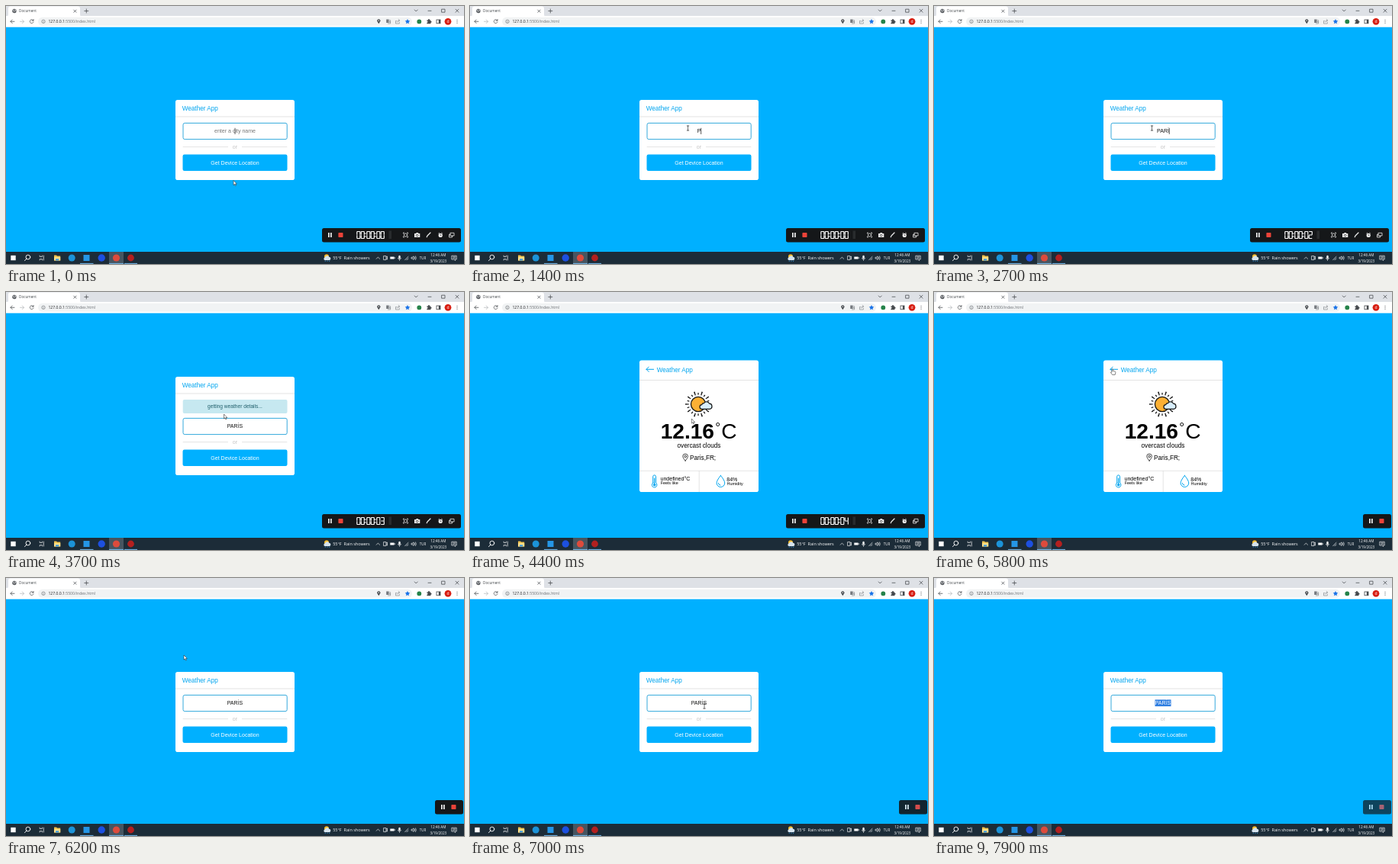
An HTML page for the animation above (8 s loop, 600 by 338 pixels).

```html
<!DOCTYPE html>
<html lang="en">
<head>
<meta charset="utf-8">
<title>Weather App</title>
<style>
  html, body { margin: 0; width: 100%; height: 100%; overflow: hidden; background: #00b0ff; }
  svg { display: block; width: 100vw; height: 100vh; }
  text { white-space: pre; font-family: "Liberation Sans", Arial, sans-serif; }
  .ui text { font-family: "Open Sans", "Noto Sans", sans-serif; }
  .line { fill: none; stroke-linecap: round; stroke-linejoin: round; }
  .mid { text-anchor: middle; }
</style>
</head>
<body>
<svg viewBox="0 0 600 338" xmlns="http://www.w3.org/2000/svg">
  <defs>
    <clipPath id="barClip"><rect id="barClipRect" y="291" height="18.5" rx="2.5"/></clipPath>
    <path id="arrow" d="M0 0V6.1L1.4 4.8L2.4 7L3.3 6.6L2.4 4.5H4.3Z" fill="#fff" stroke="#222" stroke-width=".55"/>
    <path id="beam" class="line" d="M-1.3 -3H1.3M0 -3V3M-1.3 3H1.3" stroke="#333" stroke-width=".7"/>
    <path id="hand" d="M0 0Q.8 -.6 1.4 .1V2.5L4.2 3.1Q5 3.4 4.9 4.3L4.2 7.4H.6L-1.5 4.5Q-1.4 3.6 -.5 3.9L0 4.3Z" fill="#fff" stroke="#333" stroke-width=".6"/>
  </defs>
  <rect width="600" height="338" fill="#00b0ff"/>

  <g class="ui" id="browser">
    <rect width="600" height="13.5" fill="#dee1e6"/>
    <path d="M1 13.5Q3 13.5 3 11V3Q3 .5 6 .5H94Q97 .5 97 3V11Q97 13.5 99 13.5Z" fill="#fff"/>
    <rect y="13" width="600" height="14.7" fill="#fff"/>
    <circle cx="11" cy="6.5" r="2.7" fill="#54585d"/>
    <path class="line" d="M9.2 5.2L11 6.2L10.4 7.6M12 4.6L12.9 6.8" stroke="#fff" stroke-width=".7"/>
    <text x="17" y="8.4" font-size="4.7" fill="#45494d">Document</text>
    <g class="line" stroke="#45494d" stroke-width=".75">
      <path d="M88.8 5.1L92 8.3M92 5.1L88.8 8.3M102.8 6.5H107.8M105.3 4V9"/>
      <path d="M535.2 5L537.2 7L539.2 5M553 6.3H557M571 4.2H575V8.2H571ZM589 4.2L593 8.2M593 4.2L589 8.2"/>
      <path d="M11 20.3H6M8.2 18L6 20.3L8.2 22.6"/>
      <path d="M18.5 20.3H23.5M21.3 18L23.5 20.3L21.3 22.6" stroke="#b5b8bc"/>
      <path d="M35.7 18.8A2.4 2.4 0 1 0 36 21M36.1 17.6V19.2H34.5"/>
    </g>
    <rect x="42" y="14.8" width="490" height="11" rx="5.5" fill="#f1f3f4"/>
    <circle cx="49" cy="20.3" r="2.2" fill="none" stroke="#5f6368" stroke-width=".6"/>
    <path d="M49 19V19.4M49 20.1V21.6" stroke="#5f6368" stroke-width=".6"/>
    <text x="55.4" y="22.2" font-size="5.1" fill="#202124">127.0.0.1<tspan fill="#6b6f74">:5500/index.html</tspan></text>
    <path d="M488.3 23.3Q486.2 20.5 486.2 19.3A2.1 2.1 0 0 1 490.4 19.3Q490.4 20.5 488.3 23.3Z" fill="#45494d"/>
    <circle cx="488.3" cy="19.3" r=".7" fill="#fff"/>
    <path d="M498.2 17.5H501.5V22H498.2Z" fill="#75797e"/>
    <path class="line" d="M501.8 18.7H503.6V23H500.4M502 21.5L502.8 20L503.3 21.5" stroke="#75797e" stroke-width=".6"/>
    <path class="line" d="M511.5 19.5H510.5V23H515.3V21.5M512.3 21Q512.4 18.9 515.5 18.9M514.2 17.5L515.7 18.9L514.2 20.3" stroke="#75797e" stroke-width=".6"/>
    <path d="M526 17L527 19.1L529.3 19.4L527.6 21L528 23.3L526 22.2L524 23.3L524.4 21L522.7 19.4L525 19.1Z" fill="#1a73e8"/>
    <circle cx="541.3" cy="20.4" r="2.9" fill="#25834a"/>
    <path d="M551.4 18.4H553Q553 17 554 17T555 18.4H556.4V19.8Q557.6 19.9 557.6 20.8T556.4 21.8V23.3H551.4V21.7Q552.6 21.6 552.6 20.8T551.4 19.8Z" fill="#45494d"/>
    <rect x="564" y="18" width="5" height="4.8" fill="none" stroke="#45494d" stroke-width=".8"/>
    <path d="M566.8 18H569V22.8H566.8Z" fill="#45494d"/>
    <circle cx="579" cy="20.3" r="4.4" fill="#d81f13"/>
    <text class="mid" x="579" y="22" font-size="5" fill="#fff">d</text>
    <path d="M591 18.2V22.8" class="line" stroke="#45494d" stroke-width="1.1" stroke-dasharray="0 2"/>
  </g>

  <g id="form">
    <rect id="card" x="222" width="156" rx="2.8" fill="#fff"/>
    <g id="header">
      <text x="230.7" y="136.6" font-size="8.2" fill="#00a5ef">Weather App</text>
      <path d="M222 145H378" stroke="#d2d2d2" stroke-width=".6"/>
    </g>
    <g id="pending">
      <rect x="231.7" y="141" width="136.8" height="18" rx="2" fill="#c6e8f0"/>
      <text class="mid" x="300" y="152.2" font-size="6.64" fill="#21606c">getting weather details...</text>
    </g>
    <g id="body">
      <rect x="232" y="153.4" width="136.2" height="21.2" rx="2.2" fill="#fff" stroke="#34a9dc" stroke-width="1"/>
      <rect id="selection" x="289.5" y="159.4" width="21" height="8.7" fill="#2d7de1"/>
      <text id="entry" class="mid" x="300" y="166.4" font-size="7.04"></text>
      <path id="caret" stroke="#111" stroke-width=".7"/>
      <path d="M231.7 184.6H291M309 184.6H368.3" stroke="#d0d0d0" stroke-width=".6"/>
      <text class="mid" x="300" y="186.8" font-size="7.04" fill="#c4c4c4">or</text>
      <rect x="231.5" y="194.6" width="137" height="21.4" rx="2.2" fill="#00b0ff"/>
      <text class="mid" x="300" y="207.6" font-size="7.04" fill="#fff">Get Device Location</text>
    </g>
  </g>

  <g id="result">
    <rect x="222" y="89.5" width="156" height="172.5" rx="2.8" fill="#fff"/>
    <path class="line" d="M240.6 101.3H231M234.2 98.1L231 101.3L234.2 104.5" stroke="#00a5ef" stroke-width="1"/>
    <text x="244.7" y="105" font-size="8.2" fill="#00a5ef">Weather App</text>
    <path d="M222 115.5H378M222 234.3H378M300.2 234.3V262" stroke="#d2d2d2" stroke-width=".6"/>
    <g fill="none" stroke="#161616">
      <circle cx="299" cy="147" r="14.6" stroke-width="4.8" pathLength="10" stroke-dasharray=".15 .85" stroke-dashoffset=".075"/>
      <circle cx="299" cy="147" r="13.6" stroke-width="2.8" pathLength="10" stroke-dasharray=".15 .85" stroke-dashoffset="-.425"/>
      <circle cx="299" cy="147" r="9.6" fill="#fcb034" stroke-width="1.3"/>
      <path d="M304 153.3A2.8 2.8 0 0 1 303.6 147.7A3 3 0 0 1 306.5 145.7A4 4 0 0 1 313.6 146.2A3.6 3.6 0 0 1 314.2 153.3Z" fill="#d8eefc" stroke-width="1.2"/>
    </g>
    <text x="249.7" y="192" font-size="28.1" font-weight="bold">12.16</text>
    <text x="321.3" y="183" font-size="17">°</text>
    <text x="329.2" y="192" font-size="28.1">C</text>
    <text class="mid" x="300" y="204" font-size="8.2">overcast clouds</text>
    <g class="line" stroke="#222" stroke-width=".8">
      <path d="M282.1 221.2Q278.7 217.2 278.7 215.4A3.4 3.4 0 0 1 285.5 215.4Q285.5 217.2 282.1 221.2Z"/>
      <circle cx="282.1" cy="215.4" r="1.4"/>
    </g>
    <text x="288" y="220" font-size="8.2">Paris,FR;</text>
    <g class="line" stroke="#00a5ef" stroke-width="1">
      <path d="M239.7 250V241.8A1.9 1.9 0 0 1 243.5 241.8V250A3.3 3.3 0 1 1 239.7 250Z"/>
      <path d="M241.6 244V252" stroke-width="1.2"/>
      <circle cx="241.6" cy="252.7" r="1.3" fill="#00a5ef"/>
      <path d="M328.4 240.4Q333.7 247 333.7 250.2A5.3 5.3 0 0 1 323.1 250.2Q323.1 247 328.4 240.4Z"/>
      <path d="M325.4 250.5A3 3 0 0 0 328 253.2"/>
    </g>
    <g font-size="7.04">
      <text x="249.5" y="247.3">undefined°C</text>
      <text x="336.3" y="247.8">84%</text>
    </g>
    <g font-size="5.47">
      <text x="249.7" y="252.3">Feels like</text>
      <text x="336.5" y="252.8">Humidity</text>
    </g>
  </g>

  <g id="tooltip" class="ui">
    <rect x="288.3" y="164.3" width="59.4" height="11.4" fill="#fff" stroke="#8a8a8a" stroke-width=".5"/>
    <text class="mid" x="318" y="171.6" font-size="4.5" fill="#575757">Please fill out this field.</text>
  </g>

  <g class="ui" id="taskbar">
    <rect y="322" width="600" height="16" fill="#1c2c38"/>
    <rect x="135" y="322" width="19" height="16" fill="#475560"/>
    <path d="M97 337.4H114.5M135 337.4H154M155 337.4H172" stroke="#76b9ed" stroke-width="1"/>
    <rect x="6.3" y="326.8" width="6.4" height="6.4" fill="#fff"/>
    <g class="line" stroke="#fff" stroke-width=".9">
      <circle cx="28.9" cy="329" r="2.9"/>
      <path d="M26.8 331.2L24.5 333.6"/>
      <path d="M44.2 327V328.4H47.4V327M44.2 333V331.6H47.4V333M49.3 327V333" stroke-width=".7"/>
    </g>
    <path d="M63 326.5H66L67 327.5H71.2V333.4H63Z" fill="#f3c44e"/>
    <path d="M63 329H71.2V333.4H63Z" fill="#ffe08a"/>
    <path d="M65 331.2H69.2V333.4H65Z" fill="#3d9be0"/>
    <circle cx="86.2" cy="330" r="4.5" fill="#1c93d8"/>
    <rect x="101.5" y="326" width="8" height="8" fill="#2596e6"/>
    <circle cx="125.2" cy="330" r="4.7" fill="#1d50e0"/>
    <circle cx="144.5" cy="330" r="4.6" fill="#dd4b3c"/>
    <circle cx="163.5" cy="330" r="4.4" fill="#b3201f"/>
    <circle cx="420" cy="328.2" r="3" fill="#fbc02d"/>
    <path d="M417.5 333A2 2 0 0 1 418 329.2A3 3 0 0 1 423.4 328.7A2.2 2.2 0 0 1 423.8 333Z" fill="#d5e3ee"/>
    <path d="M418.7 333.5L418 335M421.4 333.5L420.7 335M424 333.5L423.3 335" stroke="#3fa9f5" stroke-width=".7"/>
    <g fill="#fff">
      <text x="428.2" y="332.2" font-size="5.5">55°F  Rain showers</text>
      <text x="541.8" y="331.8" font-size="4.4">TUR</text>
      <text class="mid" x="566.3" y="328.4" font-size="4.6">12:46 AM</text>
      <text class="mid" x="566.3" y="335.8" font-size="4.6">3/19/2023</text>
      <path d="M503.3 328.5H508.6V331.5H503.3ZM509 329.3H509.7V330.7H509Z"/>
      <rect x="514.3" y="326.8" width="2.4" height="4.2" rx="1.2"/>
    </g>
    <g class="line" stroke="#fff" stroke-width=".65">
      <path d="M485.2 331.2L487.4 329L489.6 331.2"/>
      <path d="M495 327.5H498V332.5H495ZM498 329L499.5 328V332L498 331"/>
      <path d="M513.5 330.3Q513.8 332 515.5 332T517.5 330.3M515.5 332V333.3"/>
      <path d="M522.5 332.6L527 328M524 332.6L527 329.6M525.6 332.6L527 331.2" stroke="#c7ced3"/>
      <path d="M531.4 329.2H532.6L534 327.8V332.4L532.6 331H531.4ZM535.3 328.8Q536.3 330 535.3 331.4M536.6 327.8Q538.2 330 536.6 332.4"/>
      <path d="M584.2 327.2H590.2V332H588.5V333.4L587 332H584.2ZM585.6 328.8H588.8M585.6 330.3H588.8"/>
    </g>
  </g>

  <g id="recorder" clip-path="url(#barClip)">
    <rect x="400" y="291" width="200" height="19" fill="#151719"/>
    <g id="controls">
      <path d="M422.9 297V303M425.9 297V303" stroke="#fff" stroke-width="1.6"/>
      <rect x="435.4" y="297" width="6.1" height="6.1" rx=".8" fill="#ec4339"/>
      <path id="digits" stroke="#fff" stroke-width="1.15" fill="none"/>
      <path d="M501.5 294.5H505V305H501.5Z" fill="#292c2e"/>
      <g class="line" stroke="#eee" stroke-width=".8">
        <circle cx="523.5" cy="300" r="2.1"/>
        <path d="M520.5 298V297H521.5M525.5 297H526.5V298M526.5 302V303H525.5M521.5 303H520.5V302"/>
        <path d="M551.2 302.7L552 301L556 297" stroke-width="1.2"/>
        <path d="M582.3 297.3H587V301H582.3ZM582.3 299.3H580.5V303H584.5V301"/>
        <path d="M566.8 298L567.7 297.2M571.6 298L570.7 297.2"/>
      </g>
      <path d="M535 298H537L537.6 297H539.8L540.4 298H542.3V303H535Z" fill="#eee"/>
      <circle cx="538.7" cy="300.5" r="1.3" fill="#fff" stroke="#151719" stroke-width=".7"/>
      <circle cx="569.2" cy="300.4" r="2.6" fill="#eee"/>
      <path d="M569.2 299V300.5H570.3" fill="none" stroke="#151719" stroke-width=".6"/>
    </g>
  </g>

  <use id="cursor"/>
</svg>
<script>
const LOOP = 8000, STEP = 100;
const $ = id => document.getElementById(id);
const set = (id, attrs) => { for (const k in attrs) $(id).setAttribute(k, attrs[k]); };
const show = (id, on) => set(id, { visibility: on ? "visible" : "hidden" });
const clamp = v => Math.max(0, Math.min(1, v));
const latest = (list, t) => list.filter(([at]) => t >= at).pop();

const typed = [[0, ""], [1400, "P"], [1800, "PA"], [2200, "PAR"], [2700, "PARİ"], [2900, "PARİS"]];
const seconds = [[0, 0], [1500, 1], [2500, 2], [3100, 3], [4300, 4], [5000, 5]];

// time, x, y, shape from that time on
const pointer = [
  [0, 298, 228.5, "arrow"], [200, 294, 219, "arrow"], [300, 288, 208, "hand"],
  [500, 279, 188, "arrow"], [600, 278, 174, "beam"], [800, 285.5, 160, "beam"],
  [3500, 285.5, 160, "arrow"], [4300, 285.5, 160, "arrow"], [4600, 300, 178, "arrow"],
  [5000, 337, 222, "arrow"], [5200, 337, 222, "arrow"], [5400, 275, 155, "arrow"],
  [5600, 218, 109, "arrow"], [5800, 233, 101, "hand"], [6200, 233, 101, "arrow"],
  [6400, 245, 118, "arrow"], [6700, 285, 158, "beam"], [7000, 307, 168, "beam"], [LOOP, 307, 168, "beam"]
];

function pointerAt(t) {
  const i = pointer.findIndex(([at]) => at > t);
  const [t0, x0, y0, shape] = pointer[i - 1], [t1, x1, y1] = pointer[i];
  const p = (t - t0) / (t1 - t0);
  return { x: x0 + (x1 - x0) * p, y: y0 + (y1 - y0) * p, shape };
}

const segments = { a: "0 0h4", b: "4 0v4.2", c: "4 4.8v4.2", d: "0 9h4", e: "0 4.8v4.2", f: "0 0v4.2", g: "0 4.5h4" };
const lit = ["abcdef", "bc", "abged", "abgcd", "fgbc", "afgcd"];

function clockPath(s) {
  let x = 459.8, d = "";
  for (const ch of "00:00:0" + s) {
    if (ch === ":") {
      d += `M${x} 297.6v1.3M${x} 301.1v1.3`;
      x += 2;
    } else {
      for (const seg of lit[ch]) {
        const [sx, rest] = segments[seg].split(" ");
        const [, sy, move] = rest.match(/^([\d.]+)(.*)$/);
        d += `M${x + +sx} ${295.5 + +sy}${move}`;
      }
      x += 5.5;
    }
  }
  return d;
}

function drawForm(t) {
  const pending = t >= 3500 && t < 3900;
  const result = t >= 3900 && t < 6200;
  const selected = t >= 7300;
  const text = latest(typed, t)[1];
  const shift = pending ? 12 : 0;
  $("form").style.display = result ? "none" : "";
  $("result").style.display = result ? "" : "none";
  set("card", { y: 123 - shift, height: 105 + 2 * shift });
  set("header", { transform: `translate(0 ${-shift})` });
  set("body", { transform: `translate(0 ${shift})` });
  show("pending", pending);
  show("selection", selected && !result);
  $("entry").textContent = text || "enter a city name";
  set("entry", { fill: selected ? "#fff" : text ? "#111" : "#777" });

  const caretX = text ? 300.3 + $("entry").getComputedTextLength() / 2 : 300;
  set("caret", { d: `M${caretX} 159.8V168` });
  show("caret", t < 500 || (t >= 1400 && t < 3500));
  show("tooltip", t >= 1200 && t < 1400);
}

function drawRecorder(t) {
  const slide = 148 * clamp((t - 5100) / 600);
  const left = 414 + slide;
  const right = slide ? 599 : 596;
  set("barClipRect", { x: left, width: right - left });
  set("controls", { transform: `translate(${slide} 0)` });
  set("recorder", { opacity: 1 - .3 * clamp((t - 6900) / 300) });
  set("digits", { d: clockPath(latest(seconds, t)[1]) });
}

function render(now) {
  const t = Math.floor((now % LOOP) / STEP) * STEP;
  drawForm(t);
  drawRecorder(t);
  const { x, y, shape } = pointerAt(t);
  set("cursor", { href: "#" + shape, transform: `translate(${x} ${y})` });
  show("cursor", t < 7300);
}

function frame() {
  render(performance.now());
  requestAnimationFrame(frame);
}
frame();
</script>
</body>
</html>
```
